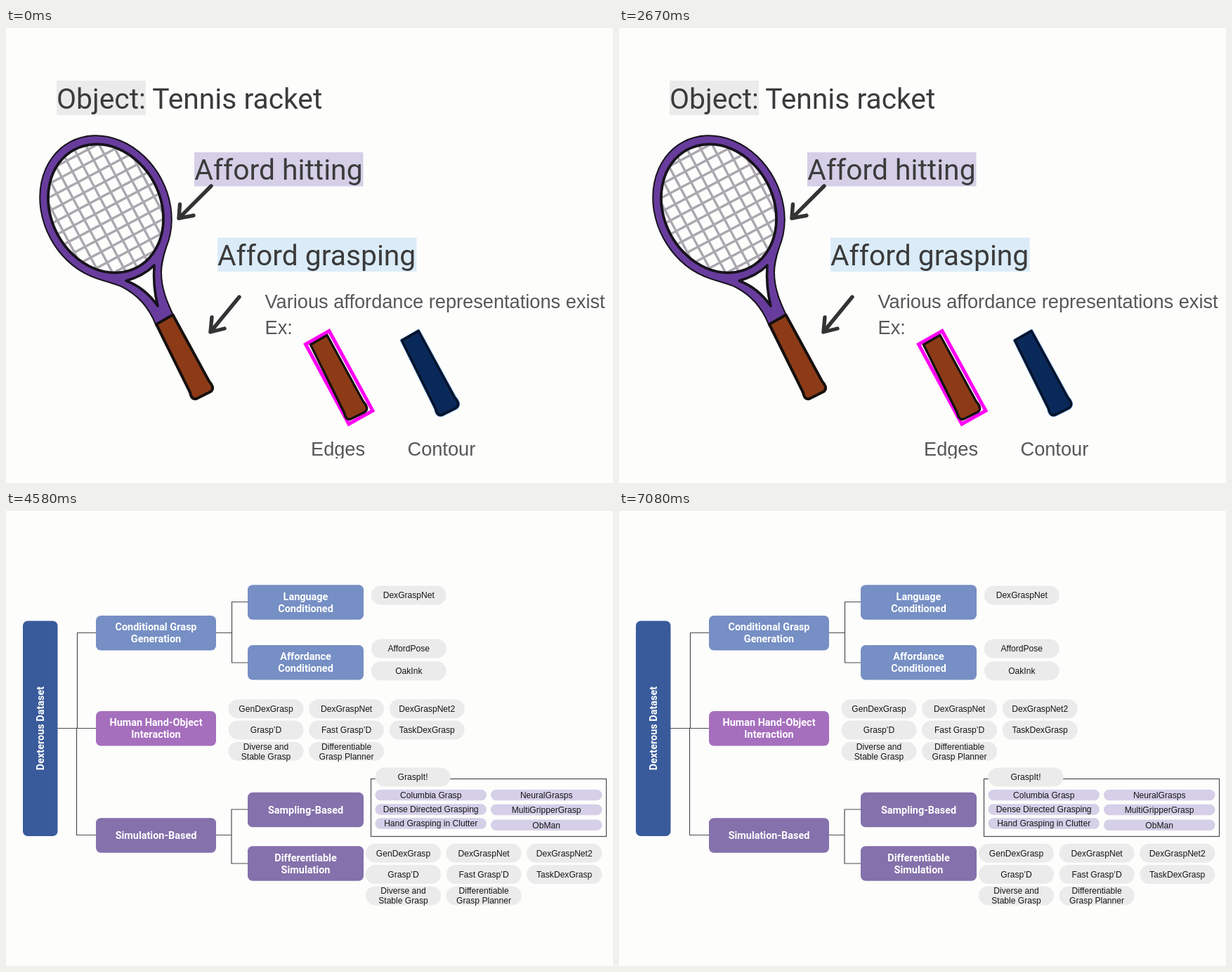
Animation, 864 px wide and 648 px high, one loop 8 s. Source, as an HTML page:

```html
<!DOCTYPE html>
<html lang="en">
<head>
<meta charset="utf-8">
<title>Affordance and dexterous datasets</title>
<style>
html, body { margin: 0; width: 100%; height: 100%; overflow: hidden; background: #fdfdfc; }
svg { display: block; width: 100vw; height: 100vh; }
.big { font: 40.8px Roboto, sans-serif; fill: #3b3b3b; }
.note { font: 27.2px "Liberation Sans", Arial, sans-serif; fill: #575757; }
.box { font: bold 14.45px Roboto, sans-serif; fill: #fff; text-anchor: middle; }
.pill { font: 12.1px "Liberation Sans", Arial, sans-serif; fill: #161616; text-anchor: middle; }
.arrow { fill: none; stroke: #333; stroke-width: 5.4; stroke-linecap: round; stroke-linejoin: round; }
.wire { fill: none; stroke: #4c4c50; stroke-width: 1.2; }
</style>
</head>
<body>
<svg viewBox="0 0 864 648">
  <defs>
    <path id="grip" d="M214 422 L237.500 408.500 L289 503 Q298 513 291 518 L271 528 Q264 530 262 519 Z" stroke-linejoin="round"/>
    <g id="frame">
      <ellipse rx="88.500" ry="106.500" transform="translate(142 257) rotate(-28)"/>
      <path d="M234 276 C233 306 220 322 220 348 C220 372 229 392 237 409 L214 422 C205 399 191 381 166 368 C153 361 134 360 116 349 Z"/>
    </g>
    <clipPath id="bed"><ellipse rx="77" ry="94"/></clipPath>
    <clipPath id="crop"><rect width="864" height="613"/></clipPath>
  </defs>

  <g id="racket">
    <rect x="72" y="75" width="127" height="49" fill="#ebebeb"/>
    <rect x="268" y="177" width="240.500" height="48.500" fill="#d5cfe7"/>
    <rect x="301" y="298.500" width="283.500" height="48.500" fill="#dbecf8"/>
    <g class="big">
      <text x="72" y="114.700">Object: Tennis racket</text>
      <text x="268.300" y="216.300">Afford hitting</text>
      <text x="301" y="337.800">Afford grasping</text>
    </g>
    <g class="note" clip-path="url(#crop)">
      <text x="368.500" y="398.500">Various affordance representations exist</text>
      <text x="368.500" y="436">Ex:</text>
      <text x="434" y="609">Edges</text>
      <text x="571.500" y="609">Contour</text>
    </g>

    <use href="#frame" fill="none" stroke="#17131c" stroke-width="4"/>
    <use href="#frame" fill="#683c9d"/>
    <path d="M171 360 Q196 353 211 338 Q209 368 216 396 Q198 370 171 360 Z" fill="#fdfdfc" stroke="#17131c" stroke-width="3.600" stroke-linejoin="round"/>
    <g transform="translate(142 257) rotate(-28)">
      <ellipse rx="77.500" ry="94.500" fill="#fdfdfc"/>
      <path id="strings" clip-path="url(#bed)" stroke="#aaa7ae" stroke-width="3.400"/>
      <ellipse rx="78" ry="95" fill="none" stroke="#17131c" stroke-width="3.800"/>
    </g>
    <use href="#grip" fill="#8d3b17" stroke="#17110f" stroke-width="4"/>

    <path class="arrow" d="M292 225 L246 271 M247.500 251 L246 271 L267 267"/>
    <path class="arrow" d="M332 383 L291 433 M293 412 L291 433 L311 428"/>

    <path d="M426.500 450.500 L460 431.500 L522 545 L488 564 Z" fill="#fdfdfc" stroke="#ff00f5" stroke-width="5"/>
    <use href="#grip" x="219.500" y="29" fill="#8d3b17" stroke="#17110f" stroke-width="3.400"/>
    <use href="#grip" x="349.500" y="23" fill="none" stroke="#3f73bd" stroke-width="4.800"/>
    <use href="#grip" x="349.500" y="23" fill="#0a295b" stroke="#061326" stroke-width="3.200"/>
  </g>

  <g id="tree" visibility="hidden">
    <path class="wire" d="M73 309.500 H128 M128 173.500 H101.500 V309.500 M100.500 309.500 V461.500 H128
      M299 173.500 H321.500 M344 129.500 H321.500 V216 H344
      M299 461.500 H321 M344 425 H321 V502 H344"/>
    <rect class="wire" x="519.500" y="381.500" width="335" height="82"/>
  </g>
</svg>
<script>
const NS = 'http://www.w3.org/2000/svg';
const LOOP = 8000, CUT = 4000;
const racket = document.getElementById('racket');
const tree = document.getElementById('tree');

function add(tag, attrs, text) {
  const el = document.createElementNS(NS, tag);
  for (const key in attrs) el.setAttribute(key, attrs[key]);
  if (text) el.textContent = text;
  tree.append(el);
  return el;
}

function label(cls, cx, cy, text, leading, drop) {
  const lines = text.split('|');
  lines.forEach((line, i) => add('text', {
    class: cls, x: cx, y: cy + (i - (lines.length - 1) / 2) * leading + drop
  }, line));
}

function box(x, y, w, fill, text) {
  add('rect', { x, y, width: w, height: 49.5, rx: 7, fill });
  label('box', x + w / 2, y + 24.8, text, 17, 5.1);
}

function pill(cx, cy, text, w = 107, h = 27, fill = '#ebebeb') {
  add('rect', { x: cx - w / 2, y: cy - h / 2, width: w, height: h, rx: h / 2, fill });
  label('pill', cx, cy, text, 14, 4.3);
}

const bar = (cx, cy, text) => pill(cx, cy, text, 158.5, 15.5, '#d5cfe8');

function pillGrid(x, y) {
  const names = ['GenDexGrasp', 'DexGraspNet', 'DexGraspNet2', 'Grasp’D', 'Fast Grasp’D',
    'TaskDexGrasp', 'Diverse and|Stable Grasp', 'Differentiable|Grasp Planner'];
  names.forEach((name, i) => pill(x + (i % 3) * 114.6, y + Math.floor(i / 3) * 30.3, name));
}

let d = '';
for (let i = -6; i <= 6; i++) {
  const p = i * 17.2;
  d += `M${p} -100V100M-100 ${p}H100`;
}
document.getElementById('strings').setAttribute('d', d);

add('rect', { x: 24, y: 156.5, width: 49.5, height: 306.5, rx: 7, fill: '#395b9b' });
add('text', { class: 'box', transform: 'translate(54 309.5) rotate(-90)' }, 'Dexterous Dataset');

const blue = '#768fc4', violet = '#8571ab';
box(128, 149, 171, blue, 'Conditional Grasp|Generation');
box(128, 285, 171, '#a66fbd', 'Human Hand-Object|Interaction');
box(128, 437.3, 171, violet, 'Simulation-Based');
box(344, 105.3, 165, blue, 'Language|Conditioned');
box(344, 191, 165, blue, 'Affordance|Conditioned');
box(344, 400.7, 165, violet, 'Sampling-Based');
box(344, 477.3, 165, violet, 'Differentiable|Simulation');

pill(573.3, 120, 'DexGraspNet');
pill(573.3, 196, 'AffordPose');
pill(573.3, 227.8, 'OakInk');
pillGrid(370, 281.7);
pillGrid(565.5, 487.3);
pill(579, 379, 'GraspIt!');

bar(604.7, 404.5, 'Columbia Grasp');
bar(604.7, 425, 'Dense Directed Grasping');
bar(604.7, 445, 'Hand Grasping in Clutter');
bar(769.2, 404.5, 'NeuralGrasps');
bar(769.2, 425.5, 'MultiGripperGrasp');
bar(769.2, 447.3, 'ObMan');

function render(ms) {
  const first = ms % LOOP < CUT;
  racket.setAttribute('visibility', first ? 'visible' : 'hidden');
  tree.setAttribute('visibility', first ? 'hidden' : 'visible');
}

const start = performance.now();
function tick() {
  render(performance.now() - start);
  requestAnimationFrame(tick);
}
tick();
</script>
</body>
</html>
```
